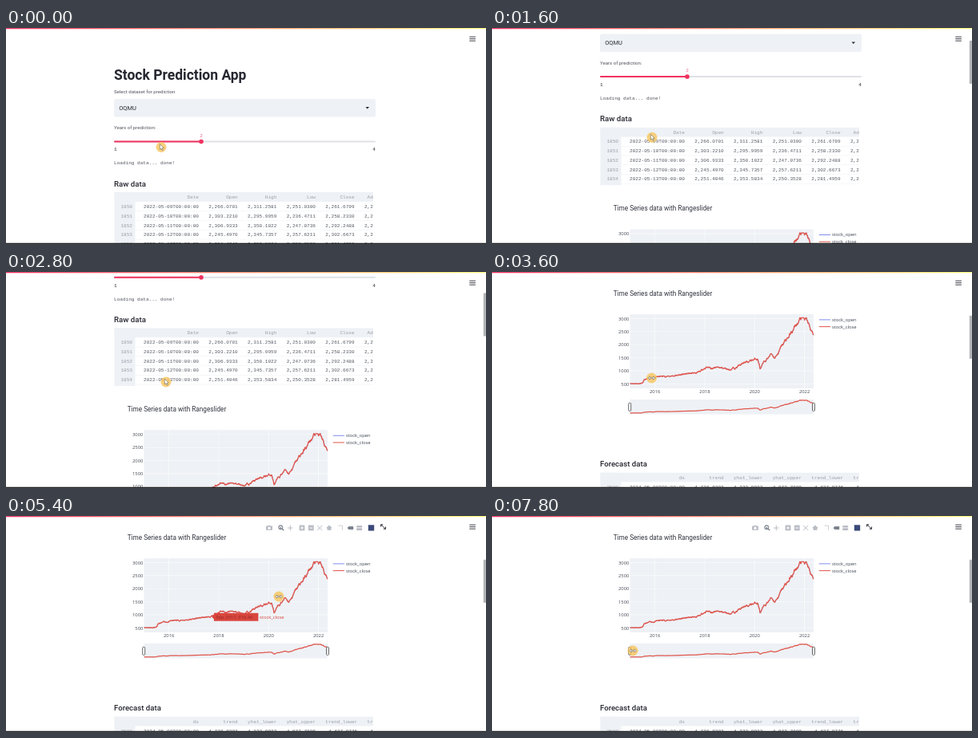
Recreate the animation shown at these times as an HTML page with a canvas. Size 600 by 271 pixels, loop 8 s.

```html
<!DOCTYPE html>
<html lang="en">
<head>
<meta charset="utf-8">
<title>Stock Prediction App</title>
<style>
html, body { margin: 0; width: 100%; height: 100%; overflow: hidden; background: #fff; }
canvas { display: block; width: 600px; height: 271px; }
</style>
</head>
<body>
<canvas id="stage"></canvas>
<script>
const W = 600, H = 271, LOOP = 8000, STEP = 200;
const canvas = document.getElementById('stage');
const ratio = window.devicePixelRatio || 1;
canvas.width = W * ratio;
canvas.height = H * ratio;
const ctx = canvas.getContext('2d');

const SANS = 'Roboto, sans-serif';
const SMALL = '6.1px ' + SANS;
const MONO = '6.05px "Liberation Mono", monospace';
const PLOT = '5.8px "Open Sans", sans-serif';
const INK = '#262730', GREY = '#50535c', PANEL = '#eef1f5', PINK = '#f0325f', RED = '#e0544a';

// Each key is [position, value, ...]
function at(keys, t) {
  const i = keys.findIndex(k => k[0] > t);
  if (i < 0) return keys[keys.length - 1].slice(1);
  if (i === 0) return keys[0].slice(1);
  const a = keys[i - 1], b = keys[i], u = (t - a[0]) / (b[0] - a[0]);
  return a.slice(1).map((v, j) => v + (b[j + 1] - v) * u);
}

// Wheel notches: every one eases the page by a fixed distance
const NOTCH = 46.85;
const wheelDown = [1000, 1404, 2528, 2800, 3000, 3150, 3850], wheelUp = [4850];
function eased(t, from) {
  const u = Math.min(1, Math.max(0, (t - from) / 400));
  return 1 - (1 - u) ** 2;
}
const turned = (times, t) => times.reduce((sum, from) => sum + eased(t, from), 0);
const scrollAt = t => NOTCH * (turned(wheelDown, t) - turned(wheelUp, t));

const mouseKeys = [[0, 194, 149.5], [1200, 200, 137], [2800, 200, 138], [3600, 199.5, 133],
  [4000, 204, 133], [5000, 204, 133], [5400, 341, 101], [6000, 330, 112],
  [7000, 168, 169], [7800, 176, 169]];
const HOVER_LAG = 245;

let seed = 11;
function rand() {
  seed = (seed * 16807) % 2147483647;
  return seed / 2147483647 - 0.5;
}

function rect(x, y, w, h, color, r = 0) {
  ctx.fillStyle = color;
  ctx.beginPath();
  ctx.roundRect(x, y, w, h, r);
  ctx.fill();
}

function disc(x, y, r, color) {
  ctx.fillStyle = color;
  ctx.beginPath();
  ctx.arc(x, y, r, 0, Math.PI * 2);
  ctx.fill();
}

function path(points, color, width) {
  ctx.beginPath();
  points.forEach(([x, y]) => ctx.lineTo(x, y));
  ctx.strokeStyle = color;
  ctx.lineWidth = width;
  ctx.stroke();
}

function fill(points, color) {
  ctx.beginPath();
  points.forEach(([x, y]) => ctx.lineTo(x, y));
  ctx.closePath();
  ctx.fillStyle = color;
  ctx.fill();
}

function text(s, x, y, font, color, align = 'left') {
  ctx.font = font;
  ctx.fillStyle = color;
  ctx.textAlign = align;
  ctx.fillText(s, x, y);
}

// Price: a few turning points plus a mean-reverting random walk
const turns = [[2015, 525], [2015.5, 530], [2015.58, 640], [2016, 745], [2017.8, 925],
  [2018.05, 1150], [2019, 1060], [2020.12, 1480], [2020.22, 1080], [2020.67, 1650],
  [2020.8, 1530], [2021.85, 2960], [2022.1, 2840], [2022.36, 2290]];
const PLOT_X = 172.5, PLOT_W = 229.5, YEAR_W = 31.16;
const priceAt = year => at(turns, year)[0];
const yearX = year => PLOT_X + (year - 2015) * YEAR_W;
const priceY = p => 421.5 - (p - 500) * 0.0328;

let swing = 0;
const closes = Array.from({ length: 640 }, (_, i) => {
  const year = 2015 + 7.36 * i / 639;
  swing = swing * 0.93 + rand() * 0.043;
  return [yearX(year), priceY(Math.min(3030, priceAt(year) * (1 + swing)))];
});
const opens = closes.map(([x], i) => [x, closes[Math.max(0, i - 1)][1]]);
const mini = closes.map(([x, y]) => [x, 441 + (y - 334) * 0.195]);

// Column: [heading, first value, rise per row, spread]
function makeTable(top, first, dateHead, month, day, columns) {
  const comma = v => v.toLocaleString('en-US', { minimumFractionDigits: 4, maximumFractionDigits: 4 });
  let right = 241;
  const edges = columns.map(([head]) => right += 3.63 * Math.max(10, head.length) + 12.35);
  const rows = Array.from({ length: 5 }, (_, i) => [
    `${month}-${String(day + i).padStart(2, '0')}T00:00:00`,
    ...columns.map(([, start, rise, spread]) => comma(start + i * rise + (i && rand() * spread)))
  ]);
  return { top, first, rows, heads: [dateHead, ...columns.map(c => c[0])], edges: [241, ...edges] };
}
const rawTable = makeTable(206, 1850, 'Date', '2022-05', 9, [
  ['Open', 2266.0701, 4, 70], ['High', 2311.2581, 8, 50], ['Low', 2251.03, 3, 50],
  ['Close', 2261.6799, 9, 50], ['Adj Close', 2261.6799, 9, 50]]);
const forecastTable = makeTable(532.7, 2580, 'ds', '2024-05', 8, [
  ['trend', 4738.9202, 2.29165, 0], ['yhat_lower', 4323.9932, 4, 30],
  ['yhat_upper', 4973.7809, 2, 20], ['trend_lower', 4437.8776, 1.5, 0.2],
  ['trend_upper', 4998.1204, 0.4, 0.2]]);

function drawTable({ top, first, heads, edges, rows }) {
  const faint = '#9b9fa9';
  ctx.save();
  ctx.beginPath();
  ctx.rect(135, top, 324, 73);
  ctx.clip();
  rect(135.5, top, 324, 12, PANEL);
  rect(135.5, top, 26, 73, PANEL);
  heads.forEach((s, i) => text(s, edges[i], top + 8.2, MONO, faint, 'right'));
  rows.forEach((row, i) => {
    const y = top + 20 + i * 11.75;
    rect(161.5, y + 3.6, 298, 0.4, '#eef0f4');
    text(first + i, 158, y, MONO, faint, 'right');
    row.forEach((s, j) => text(s, edges[j], y, MONO, '#555963', 'right'));
  });
  ctx.restore();
}

function drawForm() {
  text('Stock Prediction App', 135, 64.7, 'bold 17.5px ' + SANS, INK);
  text('Select dataset for prediction', 135, 82, SMALL, GREY);
  rect(135, 89, 327, 22.5, PANEL, 1.8);
  text('OQMU', 141.2, 103, '7.5px ' + SANS, INK);
  fill([[449.5, 99], [454, 99], [451.75, 101.6]], INK);
  text('Years of prediction:', 135, 127.2, SMALL, GREY);
  rect(135, 141.6, 327, 1.8, '#dfe1e5', 0.9);
  rect(135, 141.6, 109, 1.8, PINK, 0.9);
  disc(244, 142.5, 2.8, PINK);
  text('2', 244, 137, MONO, '#f2668a', 'center');
  text('1', 135, 154.4, MONO, INK);
  text('4', 462, 154.4, MONO, INK, 'right');
  text('Loading data... done!', 135, 171.3, MONO, GREY);
  text('Raw data', 135, 198.5, '500 9.65px ' + SANS, INK);
}

function drawHandle(x) {
  rect(x - 1.5, 445.5, 3, 10, '#fff', 1);
  ctx.strokeStyle = '#444';
  ctx.lineWidth = 0.8;
  ctx.stroke();
}

function drawChart() {
  const label = '#444a55';
  text('Time Series data with Rangeslider', 151.7, 310.8, '8.2px ' + SANS, '#31333f');
  rect(PLOT_X, 334, PLOT_W, 93, PANEL);
  for (let p = 500; p <= 3000; p += 500) {
    rect(PLOT_X, priceY(p) - 0.25, PLOT_W, 0.5, '#fff');
    text(p, 171.3, priceY(p) + 2.1, PLOT, label, 'right');
  }
  for (let year = 2016; year <= 2022; year += 2) {
    rect(yearX(year) - 0.25, 334, 0.5, 93, '#fff');
    text(year, yearX(year), 432.7, PLOT, label, 'center');
  }
  ctx.lineJoin = 'round';
  path(opens, '#8a74b8', 0.6);
  path(closes, RED, 1.25);
  rect(PLOT_X, 441, PLOT_W, 18.5, PANEL);
  path(mini, RED, 1.2);
  drawHandle(172.2);
  drawHandle(402);
  [['stock_open', '#7f8bf0'], ['stock_close', RED]].forEach(([name, color], i) => {
    const y = 341 + i * 8.7;
    rect(408.8, y - 0.5, 14.2, 1, color);
    text(name, 425, y + 2, PLOT, '#3c4250');
  });
}

function drawToolbar() {
  const soft = '#b9bdc5', mid = '#7c828d', dark = '#3a3d46';
  const bar = (x, y, w, h, color) => rect(x - w / 2, y - h / 2, w, h, color, 0.4);
  const plus = (x, r, color, both = true) => {
    bar(x, 0, r * 2, 1, color);
    if (both) bar(x, 0, 1, r * 2, color);
  };
  ctx.save();
  ctx.translate(0, 296);
  // camera
  bar(329, 0.3, 8, 5.2, soft);
  bar(329, -2.5, 3, 1.5, soft);
  disc(329, 0.3, 1.6, '#fff');
  // magnifier
  disc(343.3, -0.7, 2.9, mid);
  disc(343.3, -0.7, 1.8, '#fff');
  plus(343.3, 1.1, mid);
  path([[345, 1], [347.3, 3.2]], mid, 1.4);
  // pan
  plus(355.3, 3.4, soft);
  // zoom in, zoom out
  [370, 381.3].forEach((x, i) => {
    bar(x, 0, 6.8, 6.8, soft);
    plus(x, 2, '#fff', i === 0);
  });
  // autoscale
  [-3, 3].forEach(d => path([[389.2, d], [395.2, -d]], soft, 1));
  // home
  fill([[400.2, 0], [404, -3.4], [407.8, 0]], soft);
  bar(404, 1.4, 5, 3, soft);
  // spike lines
  path([[415.5, -2.8], [420.5, -2.8], [420.5, 3]], soft, 0.7);
  // hover modes
  fill([[426.5, 0], [428.5, -2], [434.2, -2], [434.2, 2], [428.5, 2]], mid);
  [-1.7, 1.7].forEach(y => bar(441.7, y, 7, 2.6, soft));
  bar(456.5, 0, 7.4, 7.4, '#3c4a78');
  // fullscreen
  path([[468.6, -1.4], [468.6, -4], [471.2, -4]], dark, 1.1);
  path([[468.6, -4], [474.5, 1.2]], dark, 0.9);
  path([[474.5, -1.4], [474.5, 1.2], [471.9, 1.2]], dark, 1.1);
  ctx.restore();
}

function drawTooltip(x) {
  const year = 2015 + (x - PLOT_X) / YEAR_W;
  const price = priceAt(year), y = priceY(price);
  const month = new Date(2000, (year % 1) * 12).toLocaleString('en-US', { month: 'short' });
  const color = '#d9463d';
  rect(x + 2.8, y - 5, 55.5, 10, color);
  fill([[x, y], [x + 2.9, y - 2.6], [x + 2.9, y + 2.6]], color);
  text(`${month} ${Math.floor(year)}, ${price.toFixed(2)}`, x + 5.5, y + 2.1, PLOT, '#8f2a28');
  text('stock_close', x + 60, y + 2.1, PLOT, color);
}

function drawMouse(x, y, resizing) {
  disc(x, y, 6.5, 'rgba(248,197,92,0.8)');
  const half = [[-4.5, 0], [-2.2, -2], [-2.2, -0.7], [2.2, -0.7], [2.2, -2]];
  const shape = resizing
    ? [...half, ...half.map(([a, b]) => [-a, -b])]
    : [[-1.7, -4], [-1.7, 3], [0, 1.6], [1.2, 4.2], [2.3, 3.7], [1.2, 1.2], [3.3, 1.1]];
  fill(shape.map(([a, b]) => [x + a, y + b]), '#fff');
  ctx.strokeStyle = '#6b6352';
  ctx.lineWidth = 0.6;
  ctx.stroke();
}

function drawFrame(scroll) {
  const glow = ctx.createLinearGradient(0, 0, W, 0);
  glow.addColorStop(0, '#f63366');
  glow.addColorStop(1, '#fffd80');
  rect(0, 0, W, 1.3, glow);
  for (let i = 0; i < 3; i++) rect(579.3, 10.6 + i * 2.5, 7.6, 1, '#3c3e47');
  if (scroll > 0) rect(596.8, scroll * 0.195, 3.2, 54, '#b3b4b7');
  rect(0, 269.7, W, 1.3, '#222');
}

function draw(time) {
  const t = Math.floor((time % LOOP) / STEP) * STEP;
  const scroll = scrollAt(t);
  ctx.setTransform(ratio, 0, 0, ratio, 0, 0);
  rect(0, 0, W, H, '#fff');
  ctx.save();
  ctx.translate(0, -scroll);
  drawForm();
  drawTable(rawTable);
  drawChart();
  if (t >= 3800) drawToolbar();
  if (t >= 3800 && t <= 6400) drawTooltip(at(mouseKeys, t - HOVER_LAG)[0]);
  text('Forecast data', 135, 525.2, '500 9.6px ' + SANS, INK);
  drawTable(forecastTable);
  ctx.restore();
  drawFrame(scroll);
  drawMouse(...at(mouseKeys, t), t >= 3400);
}

const start = performance.now();
function tick() {
  draw(performance.now() - start);
  requestAnimationFrame(tick);
}
tick();
</script>
</body>
</html>
```
